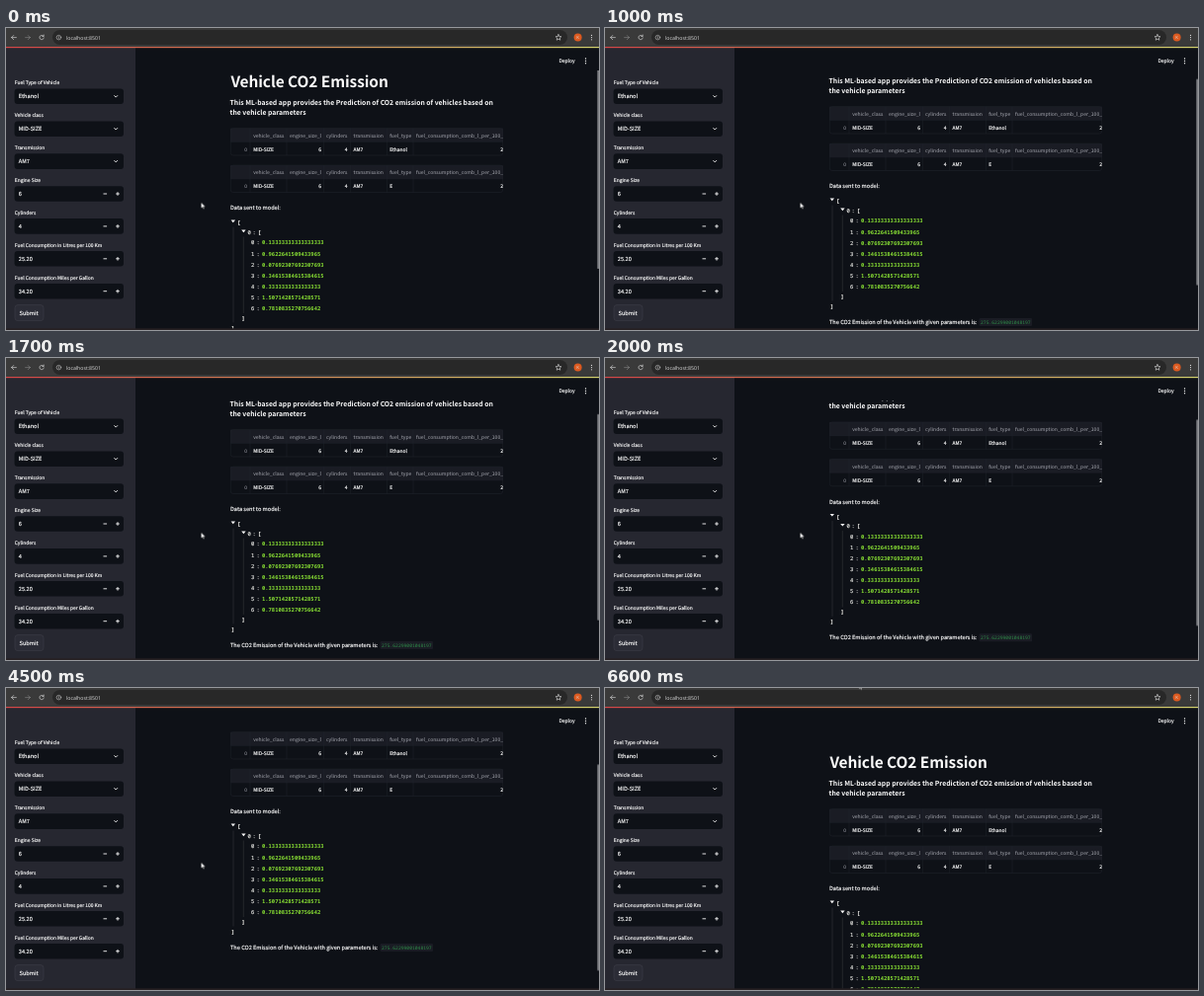
Recreate the animation shown at these times as an HTML page. Size 600 by 306 pixels, loop 6700 ms.

```html
<!DOCTYPE html>
<html lang="en">
<head>
<meta charset="utf-8">
<title>Vehicle CO2 Emission</title>
<style>
  @property --scroll { syntax: "<number>"; inherits: true; initial-value: 0; }

  html, body { margin: 0; width: 100%; height: 100%; overflow: hidden; background: #0e1117; }
  svg { display: block; width: 600px; height: 306px; }
  text {
    font-family: "Noto Sans CJK JP", "Noto Sans CJK SC", "Noto Sans CJK", "Open Sans", sans-serif;
    font-size: 5.62px;
    color: #fafafa;
    fill: currentColor;
    stroke: currentColor;
    stroke-width: .16px;
    text-rendering: geometricPrecision;
    white-space: pre;
  }
  .small { font-size: 4.95px; }
  .head { font-size: 5.05px; }
  .dim { color: #9a9ca4; stroke-width: .05px; }
  .end { text-anchor: end; }
  .title { font-size: 15.45px; font-weight: 700; letter-spacing: -.005em; stroke: none; }
  .lead { font-size: 6.84px; font-weight: 700; stroke: none; }
  .url { font: 5.2px "Open Sans", sans-serif; color: #dedede; stroke: none; }
  .mono { font: 5.49px "Noto Sans Mono", "DejaVu Sans Mono", monospace; color: #e4e4e0; }
  .bold { font-weight: 700; }
  .num { font-weight: 600; color: #86dc33; stroke: none; }
  .code { font-size: 4.7px; color: #2f8f4a; stroke: none; }
  .line { fill: none; stroke: #fafafa; stroke-width: .9; stroke-linecap: round; stroke-linejoin: round; }
  .thin { stroke: #d8d8d8; stroke-width: .65; }
  .grid { fill: none; stroke: #21242c; stroke-width: .5; }

  #main { animation: scroll 6.7s infinite; }
  #page { transform: translateY(calc(var(--scroll) * -1px)); }
  #thumb { transform: translateY(calc(var(--scroll) * .736px)); animation: hide 6.7s step-end infinite; }
  #cursor { animation: point 6.7s infinite; }

  @keyframes scroll {
    0% { --scroll: 21; animation-timing-function: steps(10); }
    14.925% { --scroll: 43; animation-timing-function: steps(7); }
    25.373% { --scroll: 50; animation-timing-function: steps(11); }
    41.791%, 67.164% { --scroll: 78; animation-timing-function: steps(4); }
    73.134%, 100% { --scroll: 0; }
  }
  @keyframes hide {
    0% { opacity: 1; }
    91.044%, 100% { opacity: 0; }
  }
  @keyframes point {
    0%, 74.626% { transform: translate(197.5px, 176.8px); animation-timing-function: steps(4); }
    80.597%, 85.074% { transform: translate(263px, 51.2px); animation-timing-function: steps(6); }
    94.029%, 100% { transform: translate(256.8px, -4.7px); }
  }
</style>
</head>
<body>
<svg viewBox="0 0 600 306">
  <defs>
    <linearGradient id="glow"><stop stop-color="#ff4b4b"/><stop offset="1" stop-color="#fffd80"/></linearGradient>
    <clipPath id="view"><path d="M131 43H600V304.4H131z"/></clipPath>
    <clipPath id="cells"><path d="M227 0H503V400H227z"/></clipPath>
  </defs>

  <rect width="600" height="306" fill="#0e1117"/>

  <g id="main" clip-path="url(#view)">
    <g id="page">
      <text class="title" x="227.4" y="80.8">Vehicle CO2 Emission</text>
      <text class="lead" x="226.6" y="99.4">This ML-based app provides the Prediction of CO2 emission of vehicles based on</text>
      <text class="lead" x="226.6" y="108.9">the vehicle parameters</text>
      <g id="tables" clip-path="url(#cells)"></g>
      <text x="227" y="205.2">Data sent to model:</text>
      <g id="json"></g>
      <text x="227" y="343">The CO2 Emission of the Vehicle with given parameters is:</text>
      <rect x="378.6" y="337" width="53.4" height="8" rx="1.2" fill="#1a1c24"/>
      <text class="mono code" x="380" y="342.7">275.62299001048197</text>
    </g>
    <rect id="thumb" x="598.3" y="20" width="1.7" height="209" rx=".8" fill="#7c7e83"/>
  </g>

  <text class="small" x="559.4" y="35.2">Deploy</text>
  <g fill="#fafafa"><circle cx="586.5" cy="31" r=".7"/><circle cx="586.5" cy="33.4" r=".7"/><circle cx="586.5" cy="35.8" r=".7"/></g>

  <rect y="19" width="131" height="286" fill="#262730"/>
  <g id="fields"></g>
  <rect x="9" y="280.6" width="29" height="16" rx="3" fill="#2b2c36" stroke="#42434d" stroke-width=".5"/>
  <text x="13.6" y="290.7">Submit</text>

  <rect width="600" height="19.6" fill="#3a3a3a"/>
  <rect x="47" y="2" width="521" height="15" rx="7.5" fill="#282828"/>
  <path class="line thin" d="M10.4 9.6H5.6M7.7 7.5L5.6 9.6l2.1 2.1"/>
  <path class="line thin" d="M19.6 9.6h4.8M22.3 7.5l2.1 2.1-2.1 2.1" opacity=".45"/>
  <path class="line thin" d="M37.9 8.2a2.2 2.2 0 1 0 .4 1.8M38.2 7v1.5h-1.5"/>
  <circle class="line thin" cx="53.4" cy="9.6" r="2.3" opacity=".8"/>
  <path class="line thin" d="M53.4 9.5v1.1M53.4 8.4v.1" opacity=".8"/>
  <text class="url" x="61" y="11.6">localhost:8501</text>
  <path class="line thin" d="M559 6.6l.8 1.9 2.1.2-1.6 1.4.5 2.1-1.8-1.1-1.8 1.1.5-2.1-1.6-1.4 2.1-.2z"/>
  <circle cx="578.6" cy="9.5" r="4" fill="#dc5a20"/>
  <text class="url" x="577.2" y="11.2" style="font-size:4.4px">K</text>
  <g fill="#e0e0e0"><circle cx="592.5" cy="7.4" r=".6"/><circle cx="592.5" cy="9.6" r=".6"/><circle cx="592.5" cy="11.8" r=".6"/></g>

  <rect y="19" width="600" height="1.2" fill="url(#glow)" opacity=".8"/>
  <rect y="304.4" width="600" height="1.6" fill="#262022"/>

  <path id="cursor" d="M0 0V5.8L1.4 4.6 2.3 6.6 3.2 6.2 2.3 4.2H4.1z" fill="#fff" stroke="#000" stroke-width=".25"/>
</svg>

<script>
  const fill = (id, html) => { document.getElementById(id).innerHTML = html; };
  const text = (x, y, str, cls = "") => `<text x="${x}" y="${y}" class="${cls}">${str}</text>`;

  // Sidebar form
  const fields = [
    ["Fuel Type of Vehicle", "Ethanol"],
    ["Vehicle class", "MID-SIZE"],
    ["Transmission", "AM7"],
    ["Engine Size", "6"],
    ["Cylinders", "4"],
    ["Fuel Consumption in Litres per 100 Km", "25.20"],
    ["Fuel Consumption Miles per Gallon", "34.20"],
  ];
  fill("fields", fields.map(([label, value], i) => {
    const y = 69.3 + 32.9 * i;
    const icon = i < 3
      ? `M109.7 ${y - .7}l1.5 1.5 1.5-1.5`
      : `M98.9 ${y}h2.8M111.6 ${y}h2.8M113 ${y - 1.4}v2.8`;
    return text(8.8, y - 12.1, label, "small")
      + `<rect x="8.6" y="${y - 7.8}" width="110.4" height="15.6" rx="3" fill="#0e1117"/>`
      + text(12.8, y + 2.1, value)
      + `<path class="line" d="${icon}"/>`;
  }).join(""));

  // Data tables: [x, header, right-aligned]
  const columns = [
    [250.2, "vehicle_class"],
    [319, "engine_size_l", true],
    [345.4, "cylinders", true],
    [351.6, "transmission"],
    [388.2, "fuel_type"],
    [415, "fuel_consumption_comb_l_per_100_km"],
  ];
  const table = (top, fuel) => {
    const cells = ["MID-SIZE", "6", "4", "AM7", fuel, ""];
    const rules = [247, 284, 321.4, 348.6, 385.4, 412].map(x => `M${x} ${top}v27.4`).join("");
    const base = top + 23.1;
    return `<rect x="227" y="${top}" width="276" height="13.7" fill="#1a1c24"/>`
      + `<path class="grid" d="M227.3 ${top + 13.7}H503${rules}"/>`
      + `<rect class="grid" x="227.3" y="${top}" width="275.4" height="27.4" rx="2.5"/>`
      + text(244, base, "0", "small dim end")
      + columns.map(([x, head, right], i) => {
          const cls = right ? " end" : "";
          return text(x, top + 9.1, head, "head dim" + cls) + text(x, base, cells[i], "small" + cls);
        }).join("")
      + text(503, base, "2", "small end");
  };
  fill("tables", table(122.6, "Ethanol") + table(160.1, "E"));

  // Expanded JSON tree
  const values = [
    "0.13333333333333333", "0.9622641509433965", "0.07692307692307693", "0.34615384615384615",
    "0.3333333333333333", "1.5071428571428571", "0.7810835270756642",
  ];
  const arrow = (x, y) => `<path d="M${x} ${y}h4.4l-2.2 2.6z" fill="#fafafa"/>`;
  fill("json",
    `<path d="M230 222.5V319.5M240.3 232.5V310" stroke="#3c3d42" stroke-width=".5"/>`
    + arrow(227.6, 215.6) + text(233.9, 220.3, "[", "mono bold")
    + arrow(238.2, 225.6) + text(244.6, 230.1, "0", "mono") + text(249.6, 230.1, ":", "mono") + text(254.8, 230.1, "[", "mono bold")
    + values.map((v, i) => {
        const y = 240.4 + 11.1 * i;
        return text(248, y, i, "mono") + text(253.4, y, ":", "mono") + text(259, y, v, "mono num");
      }).join("")
    + text(238.4, 317.1, "]", "mono bold")
    + text(228, 326.8, "]", "mono bold"));
</script>
</body>
</html>
```
